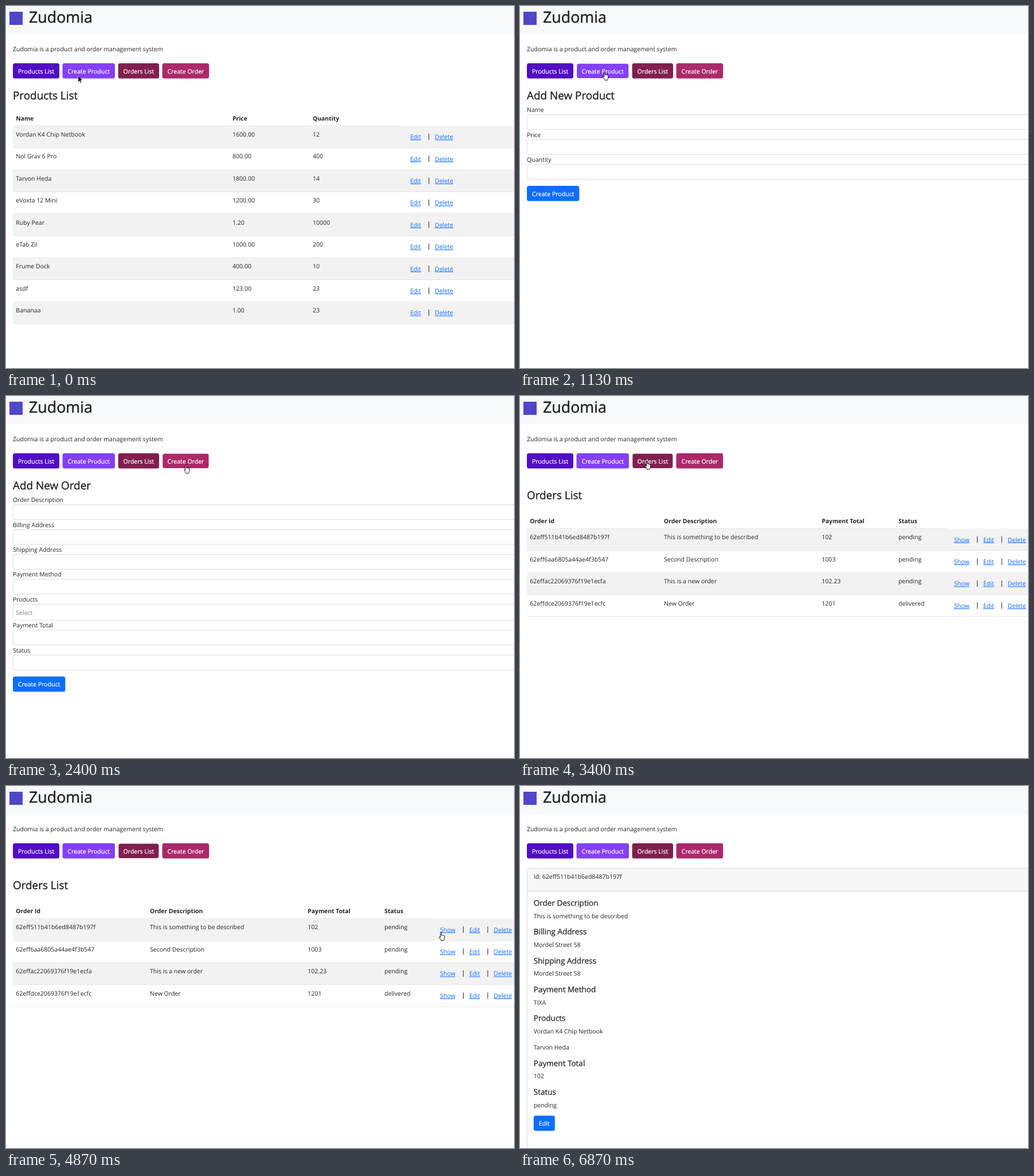
An HTML page for the animation above (7.14 s loop, 886 by 632 pixels).

```html
<!DOCTYPE html>
<html lang="en">
<head>
<meta charset="utf-8">
<title>Product and order management</title>
<style>
  html, body { margin: 0; width: 100%; height: 100%; overflow: hidden; background: #fff; }
  svg { display: block; width: 886px; height: 632px; }
  text { font: 10.55px "Open Sans", "Noto Sans", sans-serif; fill: currentColor; color: #212529;
         text-rendering: geometricPrecision; white-space: pre; }
  .brand { font-size: 26.8px; }
  .title { font-size: 18.9px; }
  .section { font-size: 13.5px; }
  .brand, .title, .section, .button { stroke: currentColor; stroke-width: .02em; }
  .button { color: #fff; }
  .head { font-size: 10.35px; font-weight: 700; }
  .link { color: #0d6efd; text-decoration: underline; }
  .hint { color: #808080; }
</style>
</head>
<body>
<svg id="stage" viewBox="0 0 886 632"></svg>
<script>
const LOOP = 7140;
const STEP = 1000 / 15;
const BLUE = '#0d6efd';
const LINE = '#dee2e6';

const text = (x, y, s, cls = '') => `<text x="${x}" y="${y}" class="${cls}">${s}</text>`;
const rect = (x, y, w, h, fill, extra = '') =>
  `<rect x="${x}" y="${y}" width="${w}" height="${h}" fill="${fill}" ${extra}/>`;
const button = (x, y, w, label, fill) =>
  rect(x, y, w, 26.6, fill, 'rx="3.5"') + text(x + 9, y + 17.5, label, 'button');

const nav = [
  { x: 12, w: 81, label: 'Products List', fill: '#520dc2' },
  { x: 98.5, w: 91.5, label: 'Create Product', fill: '#8540f5' },
  { x: 195.6, w: 71.5, label: 'Orders List', fill: '#801f4f' },
  { x: 272.5, w: 81.7, label: 'Create Order', fill: '#ab296a' }
];

function table({ top, columns, heads, rows, links, bars, headEnd }) {
  const pitch = 38.4;
  let out = heads.map((h, i) => text(columns[i], top - 9.8, h, 'head')).join('');
  rows.forEach((row, r) => {
    const y = top + r * pitch;
    if (r % 2 === 0) out += rect(12, y, 874, pitch, '#f2f2f2');
    out += rect(12, y + pitch - .7, 874, .8, LINE);
    out += row.map((cell, i) => text(columns[i], y + 18.7, cell)).join('');
    out += links.map(([x, label]) => text(x, y + 22.9, label, 'link')).join('');
    out += bars.map(x => rect(x, y + 13.4, 1.1, 11.2, '#343a40')).join('');
  });
  return out + rect(12, top - .6, headEnd - 12, .8, LINE);
}

function form(title, labels) {
  let y = 185.2;
  let out = text(12, 162.8, title, 'title');
  for (const label of labels) {
    const isSelect = label === 'Products';
    const h = isSelect ? 28 : 25.9;
    out += text(12, y, label);
    out += rect(12.3, y + 4.6, 900, h, '#fff', 'rx="2.8" stroke="#ced4da" stroke-width=".8"');
    if (isSelect) out += text(17.3, y + 23.4, 'Select', 'hint');
    y += h + 17.5;
  }
  return out + button(12, y - 1.4, 91.4, 'Create Product', BLUE);
}

function productsPage() {
  return text(12, 162.8, 'Products List', 'title') + table({
    top: 209.3, columns: [17.3, 395, 535], headEnd: 690,
    heads: ['Name', 'Price', 'Quantity'],
    rows: [
      ['Vordan K4 Chip Netbook', '1600.00', '12'],
      ['Nol Grav 6 Pro', '800.00', '400'],
      ['Tarvon Heda', '1800.00', '14'],
      ['eVoxta 12 Mini', '1200.00', '30'],
      ['Ruby Pear', '1.20', '10000'],
      ['eTab Zil', '1000.00', '200'],
      ['Frume Dock', '400.00', '10'],
      ['asdf', '123.00', '23'],
      ['Bananaa', '1.00', '23']
    ],
    links: [[705, 'Edit'], [748, 'Delete']], bars: [737]
  });
}

function ordersPage() {
  return text(12, 179.6, 'Orders List', 'title') + table({
    top: 231.7, columns: [17.3, 251, 526.3, 660], headEnd: 744,
    heads: ['Order Id', 'Order Description', 'Payment Total', 'Status'],
    rows: [
      ['62eff511b41b6ed8487b197f', 'This is something to be described', '102', 'pending'],
      ['62eff6aa6805a44ae4f3b547', 'Second Description', '1003', 'pending'],
      ['62effac22069376f19e1ecfa', 'This is a new order', '102.23', 'pending'],
      ['62effdce2069376f19e1ecfc', 'New Order', '1201', 'delivered']
    ],
    links: [[757, 'Show'], [808, 'Edit'], [850.6, 'Delete']], bars: [797, 839.7]
  });
}

function detailPage() {
  const sections = [
    ['Order Description', 'This is something to be described'],
    ['Billing Address', 'Mordel Street 58'],
    ['Shipping Address', 'Mordel Street 58'],
    ['Payment Method', 'TIXA'],
    ['Products', 'Vordan K4 Chip Netbook', 'Tarvon Heda'],
    ['Payment Total', '102'],
    ['Status', 'pending']
  ];
  let y = 209;
  let out = rect(12.4, 143.5, 900, 520, '#fff', 'rx="2.8" stroke="#d2d2d2" stroke-width=".8"') +
    rect(12.8, 143.9, 874, 39.3, '#f7f7f7') + rect(12.4, 183, 874, .8, '#d2d2d2') +
    text(23.8, 162.3, 'Id: 62eff511b41b6ed8487b197f');
  for (const [title, ...lines] of sections) {
    out += text(23.8, y, title, 'section');
    out += lines.map((line, i) => text(23.8, y + 21.6 + 28 * i, line)).join('');
    y += 50.35 + 28 * (lines.length - 1);
  }
  return out + button(23.8, 575.4, 37, 'Edit', BLUE);
}

const pages = [
  { from: 0, html: productsPage() },
  { from: 1070, html: form('Add New Product', ['Name', 'Price', 'Quantity']) },
  { from: 2330, html: form('Add New Order', ['Order Description', 'Billing Address',
    'Shipping Address', 'Payment Method', 'Products', 'Payment Total', 'Status']) },
  { from: 3400, html: ordersPage() },
  { from: 5000, html: detailPage() }
];

// Which navigation button holds the focus, from a given time on
const focus = [[0, -1], [1000, 1], [2270, 3], [3330, 2], [5070, -1]];

// Pointer tip: time, x, y
const track = [
  [0, 126, 122], [400, 68, 116], [610, 68, 116], [1000, 147.5, 114.5], [1130, 147.5, 114.5],
  [1330, 150, 115], [1340, 150, 115], [1930, 313, 119], [2210, 313, 119], [2400, 313.5, 120],
  [3070, 313.5, 120], [3530, 199, 111.5], [4270, 199, 111.5], [4870, 758.5, 255],
  [5010, 758.5, 255], [5330, 746, 256], [5610, 746, 256], [5800, 326, 268], [6000, 140.5, 322],
  [6270, 140.5, 322], [6500, 118, 244], [6870, 50, 640], [LOOP, 50, 640]
];

const cursors = {
  arrow: '<path d="M0 0V10.8L2.5 8.5L4.2 12.4L5.9 11.7L4.2 7.8H7.6Z" fill="#000" stroke="#fff" stroke-width=".5"/>',
  hand: '<path transform="translate(-3.6)" d="M2.8 1.5c0-1.2 1.8-1.2 1.8 0v4.3c.3-.9 1.8-.7 1.8.2c.3-.7 1.8-.5 1.8.4c.4-.6 1.7-.3 1.7.7v3.4c0 2-1 2.5-1.2 4.4H4c-.4-1.8-1.8-3-3.2-5.2c-.7-1.2.6-1.9 1.3-1.1l.7.9z" fill="#fff" stroke="#000" stroke-width=".9"/>',
  beam: '<path d="M-2 0H2M0 0V11.5M-2 11.5H2" fill="none" stroke="#000" stroke-width=".9"/>'
};

const stage = document.getElementById('stage');
stage.innerHTML =
  rect(0, 0, 886, 632, '#fff') + rect(0, 0, 886, 49.5, '#f8f9fc') +
  rect(6, 10, 23, 23, '#4f46c8') +
  text(40, 29.2, 'Zudomia', 'brand') +
  text(12, 79.2, 'Zudomia is a product and order management system') +
  nav.map(b => `<g class="nav">${button(b.x, 100, b.w, b.label, b.fill)}</g>`).join('') +
  pages.map(p => `<g class="page">${p.html}</g>`).join('') +
  '<g id="pointer">' +
  Object.entries(cursors).map(([kind, path]) => `<g data-kind="${kind}">${path}</g>`).join('') + '</g>';

const navRects = [...stage.querySelectorAll('.nav rect')];
const pageGroups = [...stage.querySelectorAll('.page')];
const pointer = document.getElementById('pointer');

function tipAt(t) {
  const i = track.findIndex((key, n) => n > 0 && t <= key[0]);
  const [t0, x0, y0] = track[i - 1];
  const [t1, x1, y1] = track[i];
  const u = (t - t0) / (t1 - t0);
  const e = u * u * (3 - 2 * u);
  return [x0 + (x1 - x0) * e, y0 + (y1 - y0) * e];
}

function cursorKind(t, x, y, hovered) {
  if (t >= 5990 && t < 6330) return 'beam';
  const onShow = t > 4330 && t < 5060 && x > 756 && y > 243;
  return hovered >= 0 || onShow ? 'hand' : 'arrow';
}

function draw(time) {
  const t = Math.floor((time + 4) / STEP) * STEP;
  const [x, y] = tipAt(Math.min(t, LOOP));
  const hovered = t < 60 ? -1
    : nav.findIndex(b => x >= b.x && x <= b.x + b.w && y >= 100 && y <= 126.6);
  const focused = focus.filter(([from]) => t + 4 >= from).pop()[1];
  const current = pages.filter(p => t + 4 >= p.from).length - 1;
  const kind = cursorKind(t, x, y, hovered);

  pageGroups.forEach((g, i) => { g.style.display = i === current ? '' : 'none'; });
  navRects.forEach((r, i) => {
    const inset = i === hovered || i === focused ? .7 : 0;
    r.setAttribute('x', nav[i].x + inset);
    r.setAttribute('y', 100 + inset);
    r.setAttribute('width', nav[i].w - 2 * inset);
    r.setAttribute('height', 26.6 - 2 * inset);
  });
  pointer.setAttribute('transform', `translate(${x} ${y})`);
  for (const g of pointer.children) g.style.display = g.dataset.kind === kind ? '' : 'none';
}

const start = performance.now();
function tick() {
  draw((performance.now() - start) % LOOP);
  requestAnimationFrame(tick);
}
tick();
</script>
</body>
</html>
```
